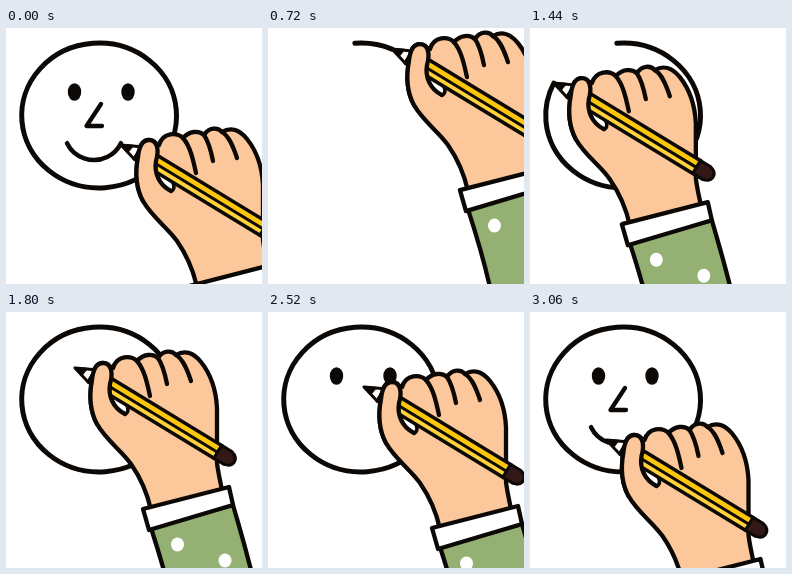
Write an HTML page with a canvas that moves like this. It is 256x256 px and loops after 3.24 s.

```html
<!DOCTYPE html>
<html lang="en">
<head>
<meta charset="utf-8">
<title>Hand drawing a face</title>
<style>
html, body { margin: 0; height: 100%; overflow: hidden; background: #fff; }
canvas { display: block; width: 100vw; height: 100vh; }
</style>
</head>
<body>
<canvas id="stage"></canvas>
<script>
const STEP = 180, STEPS = 18;
const INK = '#0c0805', SKIN = '#fcc89b', GREEN = '#95b073';
const canvas = document.getElementById('stage');
const ctx = canvas.getContext('2d');
const scale = window.devicePixelRatio || 1;
canvas.width = innerWidth * scale;
canvas.height = innerHeight * scale;

const rad = deg => deg * Math.PI / 180;
const HEAD = { x: 93.1, y: 87.5, rx: 77.4, ry: 72.4 };
const START = -94.6;
// Angle reached by the head outline at steps 3 to 9
const ANGLES = [START, -66.5, 0, 64.3, 148, 206.5, 360 + START];
const headPoint = deg => [
  HEAD.x + HEAD.rx * Math.cos(rad(deg)),
  HEAD.y + HEAD.ry * Math.sin(rad(deg))
];

// Pencil tip for every step; null means the hand is away
const TIPS = [
  [115, 117], null, null,
  ...ANGLES.map(headPoint),
  [69, 56], [69, 70], [122, 56], [122, 70],
  [96, 75], [80, 98], [97, 98], [76.5, 128]
];

// Hand shapes, measured from the pencil tip
const HAND = new Path2D(`M28-5C21-5 18 2 17 12C14 28 15 43 22 56C31 72 46 82 56 96
  C65 109 72 124 76 142L147 122C145 112 143 104 142 95L142 40C141 20 134 4 126-6
  C118-16 109-18 101-13C97-18 88-18 83-10C78-15 68-14 62-7C56-13 42-13 38 0Z`);
const CREASES = new Path2D('M62-7C69 1 72 14 75 28M83-10C88-3 90 6 92 16M101-13C108-9 112 1 116 13');
const GAP = new Path2D('M36 22C35 32 40 42 50 46C56 44 52 36 46 28Z');
const THUMB = new Path2D(`M22 56C15 43 14 28 17 12C18 2 21-5 28-5
  C37-5 38 6 35 16C33 28 38 40 50 46`);
const SLEEVE = new Path2D('M76 160L158 137C168 172 180 210 190 265L103 265C98 230 87 194 76 160Z');
const CUFF = new Path2D('M68 141L154 119L158 137L74 162Z');
const CONE = new Path2D('M1.5 2.5L20-6.5L21 8Z');
const LEAD = new Path2D('M1.5 2.5L12-3L11 5Z');
const BODY = new Path2D('M20-7.5L168-7.5L168 7.5L20 7.5Z');
const GLOSS = new Path2D('M20 0L168 0L168 7.5L20 7.5Z');
const STRIPE = new Path2D('M20 0.5L168 0.5');
const CAP = new Path2D('M167-7.5L179-7.5C189-5 189 5 179 7.5L167 7.5Z');

function paint(path, fill, width = 4.3) {
  if (fill) {
    ctx.fillStyle = fill;
    ctx.fill(path);
  }
  if (width) {
    ctx.lineWidth = width;
    ctx.stroke(path);
  }
}

function oval(x, y, rx, ry, from = 0, to = 360, back = false) {
  const path = new Path2D();
  path.ellipse(x, y, rx, ry, 0, rad(from), rad(to), back);
  return path;
}

function drawPencil() {
  ctx.save();
  ctx.translate(0, -3);
  ctx.rotate(rad(31.3));
  paint(CONE, '#fff', 3);
  paint(LEAD, INK, 2);
  paint(BODY, '#fcc60a', 0);
  paint(GLOSS, '#ffd23c', 0);
  paint(STRIPE, null, 3);
  paint(BODY, null, 3.5);
  paint(CAP, '#321816', 3);
  ctx.restore();
}

function drawHand([x, y]) {
  ctx.save();
  ctx.translate(x, y);
  paint(SLEEVE, GREEN);
  for (const [dx, dy] of [[102.5, 176.5], [150, 192.5], [130, 244]])
    paint(oval(dx, dy, 6.5, 7), '#fff', 0);
  paint(HAND, SKIN);
  paint(CUFF, '#fff');
  paint(CREASES, null);
  paint(GAP, '#fff', 3.5);
  drawPencil();
  paint(THUMB, SKIN);
  ctx.restore();
}

function drawFace(step) {
  const whole = step < 3;
  const done = n => whole || step >= n;
  const end = whole ? 360 + START : ANGLES[Math.min(step - 3, 6)];
  if (end > START)
    paint(oval(HEAD.x, HEAD.y, HEAD.rx, HEAD.ry, START, end), null, 5);
  if (done(11)) paint(oval(68.5, 64, 6.7, 8.7), INK, 0);
  if (done(13)) paint(oval(122, 64, 6.7, 8.7), INK, 0);
  if (done(15))
    paint(new Path2D('M95 76L80.5 98' + (done(16) ? 'L96 98' : '')), null);
  if (done(17))
    paint(oval(88, 102, 30, 30, 154, whole ? 26 : 109, true), null, 4.5);
}

function frame(now) {
  const step = Math.floor(now / STEP) % STEPS;
  ctx.setTransform(canvas.width / 256, 0, 0, canvas.height / 256, 0, 0);
  ctx.fillStyle = '#fff';
  ctx.fillRect(0, 0, 256, 256);
  ctx.strokeStyle = INK;
  ctx.lineJoin = ctx.lineCap = 'round';
  drawFace(step);
  if (TIPS[step]) drawHand(TIPS[step]);
}

const begin = performance.now();
function tick() {
  frame(performance.now() - begin);
  requestAnimationFrame(tick);
}
tick();
</script>
</body>
</html>
```
